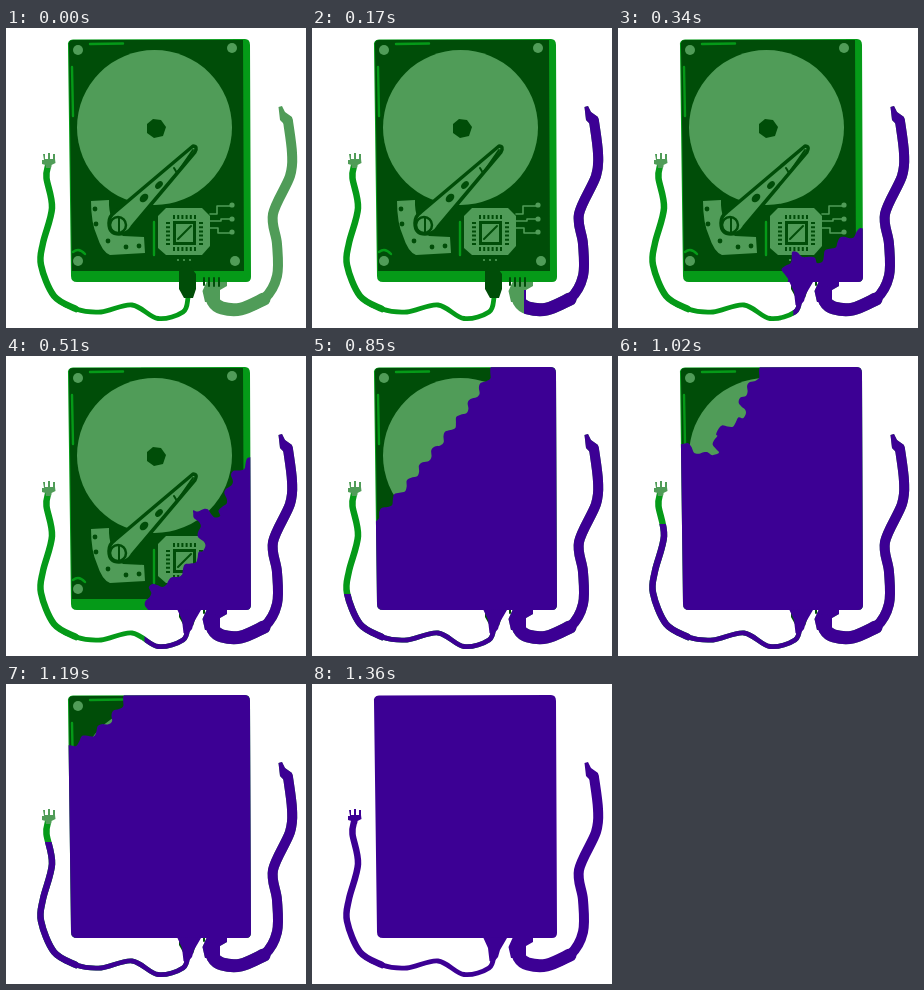
These frames come from a looping animation (300 by 300 pixels, 1.53 s). An HTML page:

```html
<!DOCTYPE html>
<html lang="en">
<head>
<meta charset="utf-8">
<title>Hard drive</title>
<style>
  html, body { margin: 0; width: 100%; height: 100%; overflow: hidden; background: #fff; }
  svg { display: block; width: 100%; height: 100%; }
  .dark { fill: #004d08; }
  .light { fill: #509c58; }
  .bright { fill: #059a18; }
  .line { fill: none; stroke-linecap: round; stroke-linejoin: round; }
  .line.dark { stroke: #004d08; }
  .line.light { stroke: #509c58; }
  .line.bright { stroke: #059a18; }
</style>
</head>
<body>
<svg viewBox="0 0 300 300">
  <defs>
    <path id="case" d="M67 11.5L239 11Q244 11 244 17L245 249Q245 254 240 254L71 254Q65 254 65 248L62 18Q61 12 67 11.5Z"/>
    <path id="plugA" d="M171 253L176 264L177.5 277L181 279L186 273L188 266L195 254Z"/>
    <path id="plugB" d="M201 253L196.5 263L199 274L214 274L214 262L221 258V253Z"/>
    <path id="tipA" d="M37 126h2v5h3v-6h2v6h3v-5h2v5l.5 4l-4 2l-.5 3h-5l-.5-3l-3.5-1v-4h2Z"/>
    <path id="tipB" d="M272.5 79L276 78L279 84L286 89L287 96L279 97L274 92Z"/>
    <g id="cableA" class="line">
      <path id="thinA" stroke-width="4.8"/>
      <path id="wideA" stroke-width="6.5"/>
    </g>
    <g id="cableB" class="line">
      <path id="thinB" stroke-width="10"/>
      <path id="wideB" stroke-width="13"/>
    </g>
    <clipPath id="reveal"><path id="edge"/></clipPath>
  </defs>

  <g id="drive">
    <use href="#cableA" stroke="#059a18"/>
    <use href="#tipA" class="light"/>
    <use href="#cableB" stroke="#509c58"/>
    <use href="#tipB" class="light"/>
    <use href="#plugB" class="light"/>
    <use href="#case" class="bright"/>
    <path class="dark" d="M67 12H237L238 243H66L63 18Q62 12 67 12Z"/>
    <path class="line bright" stroke-width="2.4" d="M84 16L117 15.5M66 39L67 88M67 224Q73 219 79 226M148 194V227"/>
    <g class="light" id="screws"></g>

    <circle class="light" cx="148.500" cy="99.500" r="77.500"/>
    <path class="dark" d="M147 91L155 92L160 99L157 108L148 110L141 105L141 96Z"/>

    <path class="light" d="M85 173L103 172Q102 193 117 208L138 209L139 225L104 227Q96 224 91 208Q85 195 85 173Z"/>
    <g class="dark" id="holes"></g>
    <path class="light" stroke="#004d08" stroke-width="3.5" stroke-linejoin="round"
      d="M187 118Q192 118 189 124L126 199Q122 206 113 206Q103 206 103 195Q103 188 109 184Z"/>
    <g class="dark">
      <ellipse cx="138" cy="170" rx="5" ry="3.5" transform="rotate(-45 138 170)"/>
      <ellipse cx="153" cy="157" rx="4.5" ry="3" transform="rotate(-45 153 157)"/>
    </g>
    <path class="line dark" stroke-width="2" d="M168 140L171 145L187 122M113 190V204"/>
    <circle class="line dark" cx="112" cy="197" r="8" stroke-width="2.5"/>

    <path class="light" d="M160 180H196L204 188V218L196 227H160L152 220V188Z"/>
    <g class="dark" id="pins"></g>
    <path class="dark" d="M167 193H190V217H167Z"/>
    <path class="light" d="M170 196H187V214H170Z"/>
    <path class="line dark" stroke-width="2" d="M172 211L185 198"/>
    <path class="line light" stroke-width="1.6" d="M204 186H211V178H226M204 193H215V191H226M204 200H212V205H226"/>
    <g class="light" id="pads"></g>

    <path class="dark" d="M173 243L177 238H184L190 246V261L187 270H178L173 261Z"/>
    <path class="line dark" stroke-width="2" d="M198 250V257M203 250V258M208 250V258M213 250V258"/>
  </g>

  <g clip-path="url(#reveal)" fill="#3c0094">
    <use href="#case"/>
    <use href="#plugA"/>
    <use href="#plugB"/>
    <use href="#tipA"/>
    <use href="#tipB"/>
    <use href="#cableA" stroke="#3c0094"/>
    <use href="#cableB" stroke="#3c0094"/>
  </g>
</svg>
<script>
(() => {
  const STEP = 170;
  const $ = id => document.getElementById(id);
  const parse = s => s.trim().split(/\s+/).map(p => p.split(',').map(Number));

  // Catmull-Rom spline through the points
  function smooth(pts) {
    const at = i => pts[Math.max(0, Math.min(pts.length - 1, i))];
    let d = 'M' + pts[0];
    for (let i = 0; i < pts.length - 1; i++) {
      const [a, b, c, e] = [at(i - 1), at(i), at(i + 1), at(i + 2)];
      const c1 = b.map((v, k) => v + (c[k] - a[k]) / 6);
      const c2 = c.map((v, k) => v - (e[k] - b[k]) / 6);
      d += `C${c1} ${c2} ${c}`;
    }
    return d;
  }

  // Adds a regular wave to a line through a few key points
  function ripple(keys, amp = 3, wave = 20) {
    const pts = [keys[0]];
    let walked = 0;
    for (let i = 1; i < keys.length; i++) {
      const [x, y] = keys[i - 1];
      const dx = keys[i][0] - x, dy = keys[i][1] - y;
      const len = Math.hypot(dx, dy), n = Math.ceil(len / 5);
      for (let j = 1; j <= n; j++) {
        const u = j / n, off = amp * Math.sin((walked + u * len) * 2 * Math.PI / wave) / len;
        pts.push([x + dx * u - dy * off, y + dy * u + dx * off]);
      }
      walked += len;
    }
    return pts;
  }

  // Area below and right of a wavy edge; tail is where the left cable changes colour
  function front(keys, tail) {
    const pts = ripple(parse(keys));
    const [x, y] = pts[pts.length - 1];
    const close = tail ? `L54 ${y}V${tail}H0V300` : `L${x} 300`;
    return smooth(pts) + close + `H300V0H${pts[0][0]}Z`;
  }

  function dots(id, list, r) {
    $(id).innerHTML += parse(list).map(([x, y]) => `<circle cx="${x}" cy="${y}" r="${r}"/>`).join('');
  }

  function cable(name, points, wide) {
    const pts = parse(points);
    $('thin' + name).setAttribute('d', smooth(pts));
    $('wide' + name).setAttribute('d', smooth(pts.slice(0, wide)));
  }

  cable('A', `42,138 40.5,150 46,180 37,215 35,237 48,268 70,281 95,284
    126,277 152,290.5 177,284 182,270`, 7);
  cable('B', `207,264 207,273 216,280 235,281 258,271 271,248 271,216 267,186
    284,148 286,125 282,93`, 5);

  dots('screws', '72,22 226,20 72,233 229,233', 5);
  dots('holes', '89,181 90,196 102,213 120,219 133,218', 2.4);
  dots('pads', '226,177 226,191 226,204', 2.6);
  dots('pads', '172,232 178,232 184,232', 1.1);
  for (let i = 0; i < 6; i++) {
    const x = 167 + i * 4.2, y = 194 + i * 4.2;
    $('pins').innerHTML += `<path d="M${x} 187h2v4h-2zM${x} 219h2v4h-2zM160 ${y}h4v2h-4zM193 ${y}h4v2h-4z"/>`;
  }

  const fronts = [
    'M0 0',
    'M248 0H300V300H212V262H248Z',
    front('247,201 219,214 199,235 188,227 174,226 166,243 168,257 177,283'),
    front('247,101 226,120 214,160 188,152 198,195 164,226 143,232 139,272'),
    front('247,23 209,54 164,98 158,121 110,153 108,200 98,230 76,256'),
    front('184,9 155,52 124,92 94,130 62,164', 238),
    front('147,9 123,42 126,62 97,76 98,97 86,99 60,85', 168),
    front('123,9 104,36 86,50 60,64', 158),
    'M0 0H300V300H0Z'
  ];

  function draw() {
    const i = Math.floor(performance.now() / STEP) % fronts.length;
    $('edge').setAttribute('d', fronts[i]);
    $('drive').style.display = i === fronts.length - 1 ? 'none' : '';
    requestAnimationFrame(draw);
  }
  draw();
})();
</script>
</body>
</html>
```
